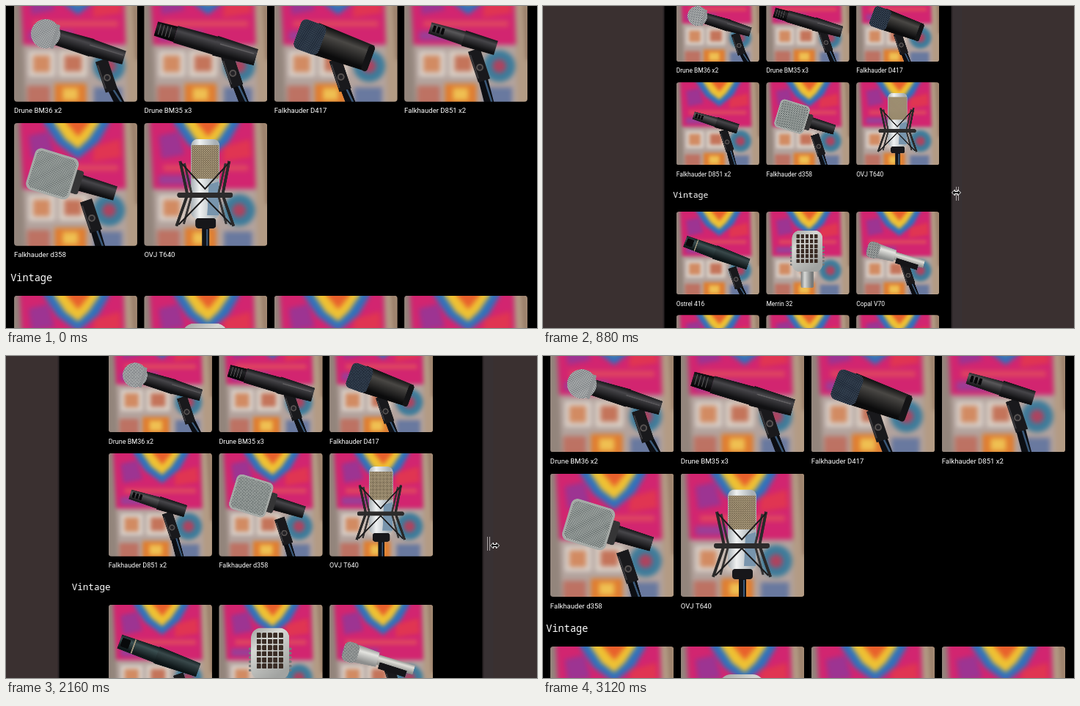
An HTML page with a canvas for the animation above (3.2 s loop, 724 px wide and 440 px high).

```html
<!DOCTYPE html>
<html lang="en">
<head>
<meta charset="utf-8">
<title>Responsive microphone grid</title>
<style>
  html, body { margin: 0; width: 100%; height: 100%; overflow: hidden; background: #3a3030; }
  canvas { display: block; }
</style>
</head>
<body>
<canvas id="stage" width="724" height="440"></canvas>
<script>
const ctx = document.getElementById('stage').getContext('2d');
const LOOP = 3200, STEP = 80, CENTER = 361, GAP = 9.5, TILE = 168;

// time, viewport width, cursor distance from the right edge, cursor y
const keys = [
  [0, 755, 7, 258], [80, 744, 7, 258], [240, 682, 7, 258], [560, 520, 7, 258],
  [880, 391, 7, 255], [1120, 310, 7, 252], [1200, 299, 7.5, 251], [1440, 288, 7.5, 251],
  [1680, 300, 11, 252], [1760, 325, 15, 253], [1840, 364, 18, 254], [2160, 577, 17, 259],
  [2240, 628, 15, 259], [2480, 735, 12, 260], [2640, 759, 10, 260], [3200, 759, 10, 260]
];

const models = ['Drune BM36 x2', 'Drune BM35 x3', 'Falkhauder D417', 'Falkhauder D851 x2', 'Falkhauder d358', 'OVJ T640'];
const vintage = ['Ostrel 416', 'Merrin 32', 'Copal V70', 'Harnel 81', 'Ostrel 20', 'Merrin 9'];

// ---- tile art, in units of 168 x 168 ----
let g;

function newTile() {
  const c = document.createElement('canvas');
  c.width = c.height = TILE * 2;
  g = c.getContext('2d');
  g.scale(2, 2);
  return c;
}
function poly(fill, ...p) {
  g.fillStyle = fill;
  g.beginPath();
  for (let i = 0; i < p.length; i += 2) g.lineTo(p[i], p[i + 1]);
  g.fill();
}
function box(fill, x, y, w, h, r = 0) {
  g.fillStyle = fill;
  g.beginPath();
  g.roundRect(x, y, w, h, r);
  g.fill();
}
const disc = (fill, x, y, r) => box(fill, x - r, y - r, 2 * r, 2 * r, r);
function line(color, width, ...p) {
  g.strokeStyle = color;
  g.lineWidth = width;
  g.beginPath();
  for (let i = 0; i < p.length; i += 2) g.lineTo(p[i], p[i + 1]);
  g.stroke();
}
function turned(x, y, deg, draw) {
  g.save();
  g.translate(x, y);
  g.rotate(deg * Math.PI / 180);
  draw();
  g.restore();
}
function shade(dark, light, x0, y0, x1, y1) {
  const s = g.createLinearGradient(x0, y0, x1, y1);
  [dark, light, dark].forEach((c, i) => s.addColorStop([0, .3, .85][i], c));
  return s;
}
function tube(x0, x1, h0, h1, dark = '#101012', light = '#47464a') {
  const h = Math.max(h0, h1) / 2;
  poly(shade(dark, light, 0, -h, 0, h), x0, -h0 / 2, x1, -h1 / 2, x1, h1 / 2, x0, h0 / 2);
}
function mesh(x, y, w, h, r, base, wire, step = 3) {
  g.save();
  box(base, x, y, w, h, r);
  g.clip();
  for (let i = -h; i < w + h; i += step) {
    line(wire, .8, x + i, y, x + i + h, y + h);
    line(wire, .8, x + i, y, x + i - h, y + h);
  }
  g.restore();
}
function stand(x, y, foot) {
  line('#0c0e13', 13, x, y, foot, 174);
  line('#3a5878', 2.5, x + 4, y + 8, foot + 4, 174);
  line('#19191c', 17, x - 9, y - 27, x + 5, y + 15);
  line('#3b3a3d', 2, x - 14, y - 20, x - 3, y + 12);
  disc('#54504f', x - 1, y - 3, 5);
  disc('#232226', x - 1, y - 3, 3);
}

function backdrop() {
  const c = newTile();
  box('#93857c', 0, 0, 168, 168);
  poly('#b39b84', 148, 0, 168, 0, 168, 168, 152, 168);
  poly('#8d705c', 158, 0, 163, 0, 168, 110, 164, 110);
  poly('#d22570', 10, 0, 147, 0, 150, 92, 15, 92);
  poly('#b3a39d', 15, 90, 150, 90, 152, 168, 18, 168);
  poly('#9d3492', 22, 20, 48, 14, 56, 44, 26, 50);
  poly('#e03552', 108, 34, 142, 24, 144, 48, 106, 54);
  poly('#2f72bd', 40, 0, 130, 0, 114, 28, 87, 50, 60, 30);
  poly('#efc233', 54, 0, 117, 0, 101, 24, 87, 37, 70, 24);
  poly('#e8602c', 70, 0, 104, 0, 93, 14, 87, 21);
  box('#df4660', 28, 58, 112, 8);
  box('#9b3e97', 22, 72, 58, 12);
  box('#d9d0c9', 22, 98, 35, 34);
  box('#d28b62', 28, 104, 22, 22);
  box('#dad0c6', 62, 98, 37, 34);
  box('#c4745a', 69, 104, 23, 21);
  disc('#3d7c9b', 128, 118, 21);
  disc('#ad4460', 128, 118, 9);
  box('#e07d30', 56, 141, 42, 27);
  box('#efc052', 67, 147, 20, 16);
  box('#bd7263', 20, 144, 30, 24);
  box('#69799f', 108, 146, 37, 22);
  return c;
}

const mics = [
  () => {
    stand(128, 138, 146);
    turned(43, 75, 17, () => {
      tube(16, 66, 22, 25);
      tube(62, 112, 24, 19);
      line('#59575a', 1.5, 62, -3, 110, -3);
      mesh(-20, -20, 40, 40, 20, '#d0d1cf', '#73787c');
      box('#8f9294', 11, -17, 5, 34, 2);
    });
  },
  () => {
    stand(122, 132, 138);
    turned(16, 68, 16, () => {
      tube(0, 28, 20, 22, '#070708', '#252528');
      for (let i = 5; i < 24; i += 5) line('#5d5c5d', 1, i, -8, i, 7);
      tube(28, 92, 24, 26);
      tube(84, 142, 28, 23);
      line('#626062', 1.5, 90, -4, 138, -4);
    });
  },
  () => {
    stand(92, 137, 106);
    turned(46, 78, 20, () => {
      tube(8, 90, 44, 37, '#0b0b0c', '#4a4845');
      box('#141416', 83, -18, 9, 37, 4);
      mesh(-15, -21, 36, 43, 8, '#495869', '#18212e');
    });
  },
  () => {
    stand(104, 124, 117);
    turned(35, 67, 17, () => {
      tube(0, 54, 16, 20, '#1a1a1c', '#59585a');
      for (let i = 4; i < 20; i += 6) box('#08080a', i, -5, 4, 9, 1);
      tube(48, 94, 22, 20);
    });
  },
  () => {
    stand(107, 133, 119);
    turned(52, 70, 17, () => {
      tube(34, 90, 23, 20);
      box('#353536', 27, -16, 14, 33, 3);
      box('#a6aaa7', -31, -30, 62, 59, 9);
      mesh(-28, -27, 56, 53, 7, '#c3c8c4', '#636b6a');
    });
  },
  () => {
    line('#111318', 10, 84, 140, 84, 170);
    line('#3a5878', 2, 86, 145, 86, 170);
    box(shade('#a8b0b5', '#f0f2f2', 64, 0, 103, 0), 64, 22, 39, 109, 9);
    mesh(65, 30, 37, 46, 2, '#c6b492', '#756851');
    poly('#7895ad', 88, 84, 102, 80, 102, 126, 86, 126);
    box('#17171a', 70, 130, 28, 14, 4);
    line('#2a2929', 4, 49, 52, 59, 98, 44, 141);
    line('#2a2929', 4, 116, 52, 107, 98, 122, 141);
    line('#353333', 3, 55, 55, 65, 98, 54, 138);
    line('#353333', 3, 111, 55, 101, 98, 112, 138);
    line('#1c1b1c', 2, 50, 54, 83, 90, 116, 54);
    line('#1c1b1c', 2, 47, 139, 83, 102, 119, 139);
    box('#2c2b2b', 45, 95, 76, 7, 3);
  },
  () => {
    stand(122, 140, 138);
    turned(18, 60, 20, () => {
      tube(0, 70, 24, 27, '#10191b', '#3d5153');
      box('#080a0b', 3, -8, 14, 15, 2);
      line('#a99d83', 2, 24, -12, 24, 12);
      tube(64, 136, 29, 23, '#0c1416', '#3a494b');
    });
  },
  () => {
    box(shade('#777a7a', '#d9dad7', 70, 0, 96, 0), 70, 116, 26, 38, 3);
    for (let y = 70; y < 112; y += 7) box('#77797a', 48, y, 70, 4, 2);
    box(shade('#a1a3a1', '#d7d8d4', 52, 38, 114, 122), 52, 38, 62, 84, 16);
    for (let i = 0; i < 30; i++)
      box('#3a2c25', 61 + i % 5 * 9, 46 + Math.floor(i / 5) * 10, 7, 8, 1);
  },
  () => {
    stand(106, 132, 122);
    turned(34, 77, 16, () => {
      tube(10, 46, 30, 24, '#8d8e8d', '#e5e5e1');
      tube(46, 107, 17, 15, '#92938f', '#e2e1db');
      mesh(-12, -16, 25, 33, 9, '#bcbeba', '#6c7173');
    });
    line('#151518', 11, 80, 99, 124, 113);
  },
  () => {}
];

const scene = backdrop();
const tiles = mics.map(draw => {
  const c = newTile();
  g.drawImage(scene, 0, 0, TILE, TILE);
  g.filter = 'blur(7px)';
  g.drawImage(scene, -3, -3, TILE + 6, TILE + 6);
  g.filter = 'none';
  draw();
  return c;
});

// ---- motion: monotone cubic through the keys ----
function sample(t, col) {
  const i = Math.max(1, keys.findIndex(k => k[0] > t));
  const slope = j => j < 1 || j >= keys.length ? 0
    : (keys[j][col] - keys[j - 1][col]) / (keys[j][0] - keys[j - 1][0]);
  const tangent = j => {
    const a = slope(j), b = slope(j + 1);
    return a * b > 0 ? 2 * a * b / (a + b) : 0;
  };
  const a = keys[i - 1], b = keys[i], d = b[0] - a[0], u = (t - a[0]) / d;
  const ease = u * u * (3 - 2 * u);
  return a[col] + (b[col] - a[col]) * ease
    + d * u * (1 - u) * ((1 - u) * tangent(i - 1) - u * tangent(i));
}

// ---- page ----
function text(str, x, mid, size, family) {
  ctx.font = `${size}px ${family}`;
  ctx.fillStyle = '#fff';
  ctx.fillText(str, x, mid + size * .355);
}

function grid(labels, first, top, w) {
  const s = 54.6 + .15 * w, pitch = s + 26.8 + .003 * w;
  const cols = Math.max(2, Math.min(4, Math.floor((.94 * w + GAP) / (s + GAP))));
  const left = CENTER - (cols * s + (cols - 1) * GAP) / 2;
  labels.forEach((label, i) => {
    const x = left + i % cols * (s + GAP), y = top + Math.floor(i / cols) * pitch;
    if (y > 440) return;
    ctx.save();
    ctx.beginPath();
    ctx.roundRect(x, y, s, s, 4);
    ctx.clip();
    ctx.drawImage(tiles[Math.min(first + i, tiles.length - 1)], x, y, s, s);
    ctx.restore();
    text(label, x, y + s + 12.2, 7.3 + .003 * w, 'Roboto, sans-serif');
  });
  return top + (Math.ceil(labels.length / cols) - 1) * pitch + s;
}

function cursor(x, y) {
  ctx.beginPath();
  [[-6, 0], [-2, -4], [-2, -1.5], [2, -1.5], [2, -4], [6, 0], [2, 4], [2, 1.5], [-2, 1.5], [-2, 4]]
    .forEach(([dx, dy]) => ctx.lineTo(x + dx, y + dy));
  ctx.closePath();
  ctx.fillStyle = '#111';
  ctx.strokeStyle = '#fff';
  ctx.lineWidth = 1;
  ctx.fill();
  ctx.stroke();
}

function render(t) {
  const w = sample(t, 1), left = CENTER - w / 2, right = CENTER + w / 2;
  const fill = (c, x, y, fw, h) => { ctx.fillStyle = c; ctx.fillRect(x, y, fw, h); };
  fill('#3a3030', 0, 0, 724, 440);
  fill('#383133', right, 0, 15, 440);
  fill('#2b2527', left - 2, 0, w + 4, 440);
  fill('#000', left, 0, w, 440);

  ctx.save();
  ctx.beginPath();
  ctx.rect(left, 0, w, 440);
  ctx.clip();
  const bottom = grid(models, 0, -37, w);
  text('Vintage', CENTER - .47 * w, bottom + 37.3 + .0076 * w, 9.2 + .0058 * w,
    '"Roboto Mono", "Noto Sans Mono", monospace');
  grid(vintage, 6, bottom + 58.9 + .012 * w, w);
  ctx.restore();

  for (const dx of [6.5, 9.5]) fill('#a9a3a4', Math.round(right + dx), 247, 1, 19);
  cursor(right + sample(t, 2), sample(t, 3));
}

const start = performance.now();
function tick() {
  const t = (performance.now() - start) % LOOP;
  render(Math.floor(t / STEP) * STEP);
  requestAnimationFrame(tick);
}
tick();
</script>
</body>
</html>
```
